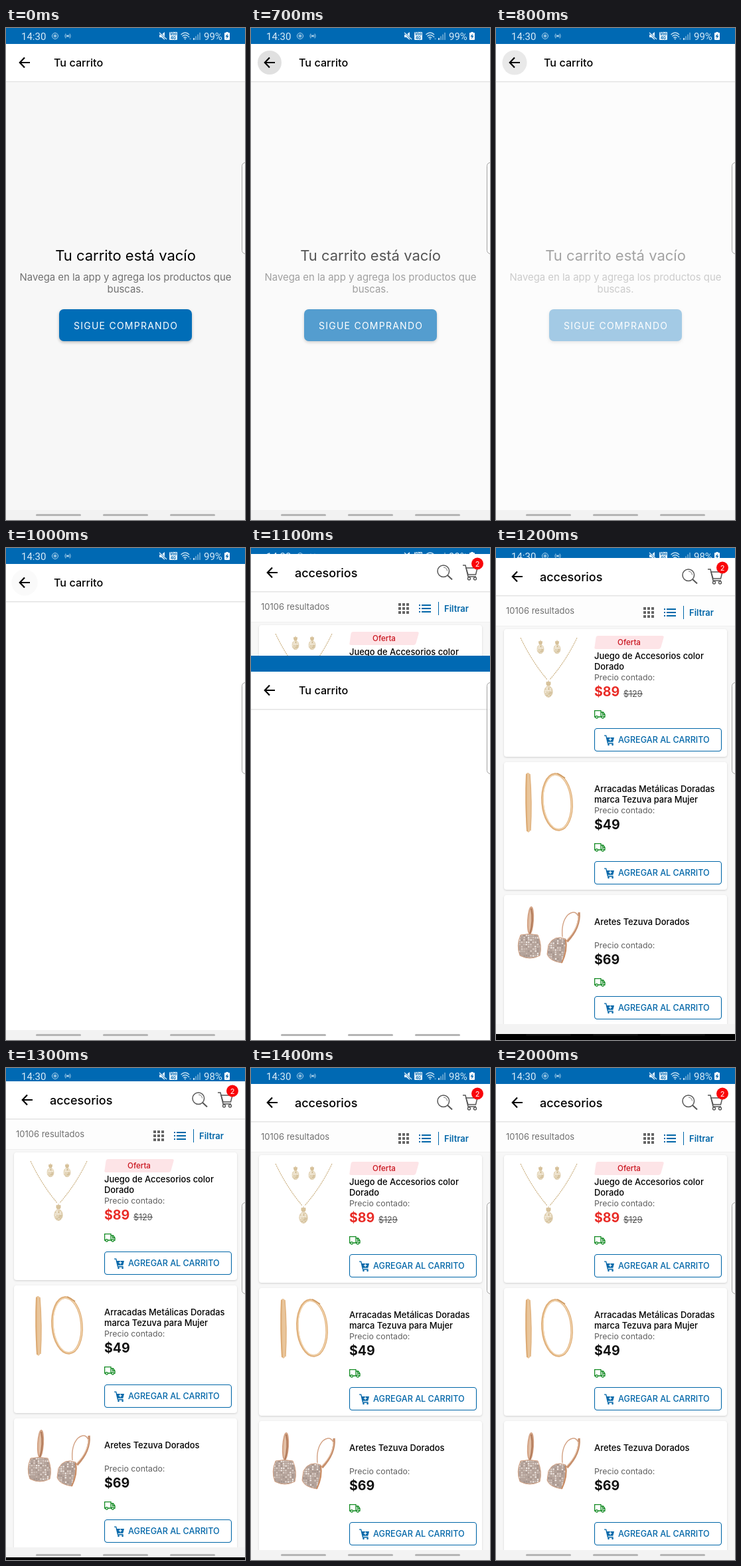
Animation, 360 px wide and 740 px high, one loop 3 s. Source, as an HTML page with a canvas:

```html
<!DOCTYPE html>
<html lang="es">
<head>
<meta charset="utf-8">
<title>Tu carrito</title>
<style>
  html, body { margin: 0; width: 100%; height: 100%; overflow: hidden; background: #fff; }
  canvas { display: block; width: 360px; height: 740px; }
</style>
</head>
<body>
<canvas id="stage" width="360" height="740"></canvas>
<script>
const ctx = document.getElementById('stage').getContext('2d');
const LOOP = 3000, STEP = 100;
const BLUE = '#0069b3', LINK = '#0066a8', GOLD = '#d0b88d', ROSE = '#d3a284';

function rect(x, y, w, h, color) {
  ctx.fillStyle = color;
  ctx.fillRect(x, y, w, h);
}

function roundRect(x, y, w, h, r) {
  ctx.beginPath();
  ctx.roundRect(x, y, w, h, r);
}

function ellipse(x, y, rx, ry = rx, turn = 0) {
  ctx.beginPath();
  ctx.ellipse(x, y, rx, ry, turn, 0, Math.PI * 2);
}

function fill(color, path) {
  ctx.fillStyle = color;
  path ? ctx.fill(path) : ctx.fill();
}

function stroke(color, width = 1, path) {
  ctx.strokeStyle = color;
  ctx.lineWidth = width;
  path ? ctx.stroke(path) : ctx.stroke();
}

function line(d, color, width = 1) { stroke(color, width, new Path2D(d)); }

function at(x, y, draw) {
  ctx.save();
  ctx.translate(x, y);
  draw();
  ctx.restore();
}

function text(str, x, y, size, color, { weight = 400, align = 'left', family = 'Inter', spacing = 0 } = {}) {
  ctx.font = `${weight} ${size}px ${family}, sans-serif`;
  ctx.textAlign = align;
  ctx.letterSpacing = spacing + 'px';
  ctx.fillStyle = color;
  ctx.fillText(str, x, y);
}

function raised(color, blur, offset, shade) {
  ctx.save();
  ctx.shadowColor = `rgba(0,0,0,${shade})`;
  ctx.shadowBlur = blur;
  ctx.shadowOffsetY = offset;
  fill(color);
  ctx.restore();
}

// Small stones scattered on a slightly jittered lattice inside a shape.
function sparkle(shape, x, y, w, h, gap, colors) {
  let seed = 7;
  const random = () => (seed = (seed * 16807) % 2147483647) / 2147483647;
  ctx.save();
  ctx.clip(shape);
  for (let j = 0; j < h; j += gap)
    for (let i = 0; i < w; i += gap) {
      ellipse(x + i + random() * 0.5, y + j + random() * 0.5, gap * 0.36);
      fill(colors[Math.floor(random() * colors.length)]);
    }
  ctx.restore();
}

// ---- System bars ----

function statusBar(time) {
  const pale = '#c4e0f3', dim = '#6aa9d6';
  const roboto = { family: 'Roboto' };
  rect(0, 0, 360, 24, BLUE);
  text('14:30', 23, 18, 15, '#d8ebf7', roboto);

  ellipse(74, 12, 4.5);
  stroke(pale, 0.9);
  line('M71 12H77M74 9V15M72 10L76 14M76 10L72 14', pale, 0.8);
  ellipse(93, 12, 1.3);
  fill(pale);
  line('M90 8.5Q87.5 12 90 15.5M96 8.5Q98.5 12 96 15.5M91.5 10Q90 12 91.5 14M94.5 10Q96 12 94.5 14', pale, 0.8);

  fill('#e4f1fa', new Path2D('M231 10H234L239 6V18L234 14H231Z'));
  line('M231 6L242 18', BLUE, 2.4);
  line('M231 7L242 17', '#e4f1fa', 1.2);

  roundRect(246, 6, 12, 12, 1);
  fill('#e4f1fa');
  text('Voo', 252, 11.3, 5.5, BLUE, { weight: 700, align: 'center' });
  text('4G', 252, 17, 5.5, BLUE, { weight: 700, align: 'center' });

  line('M263.5 10Q270 4 276 10M265.5 12.5Q270 8.5 274.5 12.5M267.5 15Q270 12.5 272 15', pale, 1.4);
  ellipse(269.8, 16.5, 1.1);
  fill(pale);
  fill(time < 2000 ? pale : dim, new Path2D('M274 14L275.3 12L276.6 14Z'));
  fill(time < 2000 ? dim : pale, new Path2D('M276 15.5H279L277.5 17.8Z'));

  for (let i = 0; i < 4; i++) rect(282 + i * 3, 15 - i * 2.7, 2, 3 + i * 2.7, i < 1 ? pale : '#5b9fcf');
  text(time < 1200 ? '99%' : '98%', 298, 18, 15, '#d8ebf7', roboto);

  rect(331.5, 6, 3, 2, '#fff');
  roundRect(329, 7, 8, 11, 1);
  fill('#fff');
  fill(BLUE, new Path2D('M334 8.5L330.5 13H332.7L332 16.7L335.6 11.8H333.3Z'));
}

function pills(color) {
  for (const x of [45, 146, 247]) {
    roundRect(x, 731, 68, 3, 1.5);
    fill(color);
  }
}

function edgeHandle() {
  roundRect(355.5, 202.5, 12, 137, 5);
  fill('rgba(255,255,255,.65)');
  stroke('#a2a2a2', 1);
}

// ---- Shared pieces ----

function appBar(title, arrowX, titleX, size, baseline) {
  rect(0, 24, 360, 56, '#fff');
  rect(0, 80, 360, 1, '#e4e4e4');
  rect(0, 81, 360, 1, '#f0f0f0');
  line(`M${arrowX + 16} 52H${arrowX + 1}M${arrowX + 8} 44.5L${arrowX + 0.8} 52L${arrowX + 8} 59.5`, '#000', 2.2);
  text(title, titleX, baseline, size, '#000', { weight: 500 });
}

function cartIcon(x, y, scale, color, solid) {
  at(x, y, () => {
    ctx.scale(scale, scale);
    const basket = new Path2D('M5 5H22L19.5 15H8Z');
    if (solid) fill(color, basket);
    else stroke(color, 1.5, basket);
    line('M0 1H4L8 18H20', color, solid ? 2 : 1.5);
    for (const wheel of [9.5, 18.5]) {
      ellipse(wheel, 21, 2);
      solid ? fill(color) : stroke(color, 1.4);
    }
    if (solid) line('M13.5 6V13M10 9.5H17', '#fff', 1.8);
  });
}

// ---- Empty cart ----

function emptyCart(contentAlpha, ripple) {
  rect(0, 24, 360, 716, '#fff');
  if (contentAlpha > 0) {
    const center = { align: 'center' };
    rect(0, 81, 360, 644, '#f7f7f7');
    text('Tu carrito está vacío', 180, 350, 22, '#000', center);
    text('Navega en la app y agrega los productos que', 180, 380, 14.9, '#717171', center);
    text('buscas.', 180, 398, 14.9, '#717171', center);
    roundRect(80, 423, 200, 48, 7);
    raised('#006db7', 4, 2, 0.25);
    text('SIGUE COMPRANDO', 180.6, 452.5, 14, '#fff', { align: 'center', spacing: 1.25 });
    rect(0, 81, 360, 644, `rgba(255,255,255,${1 - contentAlpha})`);
  }
  appBar('Tu carrito', 20, 72, 16.2, 58);
  if (ripple) {
    ellipse(28, 52, ripple.radius);
    fill(`rgba(0,0,0,${ripple.alpha})`);
  }
}

// ---- Jewellery ----

function pineapple(x, y, s) {
  const body = new Path2D();
  body.ellipse(x, y, 6.3 * s, 8.5 * s, 0, 0, Math.PI * 2);
  fill('#e6d9bf', body);
  sparkle(body, x - 7, y - 9, 14, 18, 2.4, ['#c5ad80', '#f8f2e6', '#dccba9']);
  stroke('#d8c5a0', 0.6, body);
  ellipse(x, y - 12 * s, 3.6 * s, 3.2 * s);
  fill('#dcc9a4');
  line(`M${x - 3 * s} ${y - 15 * s}L${x - 1.5 * s} ${y - 9 * s}M${x + 3 * s} ${y - 15 * s}L${x + 1.5 * s} ${y - 9 * s}M${x} ${y - 17 * s}V${y - 9 * s}`, GOLD, 0.8);
}

function necklace() {
  ctx.save();
  ctx.setLineDash([2.2, 0.8]);
  line('M37 144Q53 178 77 207M122 144Q106 178 81 207', GOLD, 1.2);
  ctx.restore();
  pineapple(67, 161, 0.8);
  pineapple(92, 161, 0.8);
  pineapple(79, 225, 1);
}

function hoops() {
  fill('#e9c59a', new Path2D('M45 349Q48 345 51 349Q55 392 52 433Q49 440 46 434Q43 392 45 349Z'));
  line('M46 349Q44.500 392 47 435', '#dcaa74', 2);
  line('M51 349Q54.500 392 52 434', '#e0b27f', 1.4);
  ellipse(92, 391, 22, 42, -0.08);
  stroke('#e0b17d', 3.6);
  ellipse(92.5, 391, 21.4, 41.2, -0.08);
  stroke('#f5dcb9', 1.2);
  line('M92 348L104 355', '#cf9c66', 2);
}

function studs() {
  const stones = ['#a2938c', '#efe9e5', '#c9bcb4', '#b3a49c', '#ded3cc'];
  const base = '#b5a299';
  ellipse(52, 569, 4, 20, 0.06);
  fill('#e2bfa5');
  stroke(ROSE, 2);
  line('M53 551Q57 570 51 590', '#b27c5c', 2.4);
  const left = new Path2D('M37 591Q50 588 63 591Q70 607 66 622Q51 630 36 622Q30 607 37 591Z');
  fill(base, left);
  sparkle(left, 32, 588, 38, 42, 3.4, stones);
  stroke(ROSE, 1, left);

  line('M100 594Q98 572 108 561Q119 552 124 563', ROSE, 1.4);
  line('M125 557Q127 580 107 601', '#c7906d', 3.4);
  line('M124 562Q124 581 107 598', '#ecd0ba', 1.1);
  const right = new Path2D('M79 606Q88 590 105 597Q106 615 99 633Q80 630 77 620Z');
  fill(base, right);
  sparkle(right, 76, 593, 32, 42, 3.4, stones);
  stroke(ROSE, 1, right);
  line('M105 598Q108 615 99 633', '#c98b62', 2);
}

// ---- Results list ----

function truck(x, y) {
  at(x, y, () => {
    const green = '#128a22';
    line('M2 10H.6V.6H10V10H5.500M10 3H13.500L16 6.500V10H14.500M10 10H11M12.500 3V6.500H16', green, 1.3);
    for (const wheel of [3.7, 12.8]) {
      ellipse(wheel, 10.4, 1.7);
      stroke(green, 1.3);
    }
  });
}

function card({ top, height, title, titleY, priceY, price, before, picture }) {
  roundRect(12, top, 336, height, 4);
  raised('#fff', 3, 1, 0.16);
  picture();
  title.forEach((row, i) => text(row, 148, titleY + i * 15.7, 12.9, '#000', { weight: 500 }));
  text('Precio contado:', 148, priceY, 12.3, '#606060');
  text(price, 148, priceY + 24, 19.6, before ? '#e92c27' : '#111', { weight: 700 });
  if (before) {
    text(before, 192, priceY + 24.5, 12.5, '#555');
    rect(192, priceY + 20, 29, 1, '#555');
  }
  truck(148, priceY + 45);
  roundRect(148.5, priceY + 72.5, 191, 34, 4);
  stroke(LINK, 1.1);
  cartIcon(163, priceY + 82.5, 0.68, LINK, true);
  text('AGREGAR AL CARRITO', 184, priceY + 94, 12.6, LINK, { weight: 500 });
}

const cards = [
  { top: 131, height: 192, title: ['Juego de Accesorios color', 'Dorado'], titleY: 176, priceY: 208, price: '$89', before: '$129', picture: necklace },
  { top: 331, height: 192, title: ['Arracadas Metálicas Doradas', 'marca Tezuva para Mujer'], titleY: 376, priceY: 408, price: '$49', picture: hoops },
  { top: 531, height: 200, title: ['Aretes Tezuva Dorados'], titleY: 576, priceY: 611, price: '$69', picture: studs }
];

function results() {
  rect(0, 80, 360, 46, '#fdfdfd');
  rect(0, 126, 360, 614, '#f7f7f7');
  appBar('accesorios', 24, 66, 18, 59);

  ellipse(289.8, 49.7, 8.8);
  stroke('#555', 1.5);
  line('M290 44Q295 44.500 295.500 49.500', '#777', 1);
  line('M296 56L303 62.500', '#555', 2);
  cartIcon(319, 40, 1, '#555', false);
  ellipse(341, 38.5, 9);
  fill('#f90509');
  text('2', 341, 42.5, 11, '#fff', { align: 'center' });

  text('10106 resultados', 15, 107.5, 13, '#707070');
  for (let i = 0; i < 9; i++) rect(222 + (i % 3) * 6, 98 + Math.floor(i / 3) * 6, 4, 4, '#666');
  for (let y = 100; y < 113; y += 5) {
    rect(253, y, 2, 2, LINK);
    rect(257, y, 14, 2, LINK);
  }
  rect(282, 96, 1, 20, LINK);
  text('Filtrar', 291, 110.5, 13, LINK, { weight: 600 });
  rect(0, 126, 360, 1, '#efefef');

  cards.forEach(card);
  fill('#fde4e7', new Path2D('M154 141H250Q253.500 141 252.500 144L248.500 158Q247.500 161 244.500 161H151Q147.500 161 148.500 158L150.500 144Q151 141 154 141Z'));
  text('Oferta', 200.5, 155, 11.5, '#c9121c', { align: 'center', weight: 500 });
  rect(0, 725, 360, 15, '#f3f3f3');
}

// ---- Timeline ----

function draw(now) {
  const time = Math.floor((now % LOOP) / STEP) * STEP;
  ctx.clearRect(0, 0, 360, 740);
  statusBar(time);

  if (time < 1100) {
    const step = (time - 700) / STEP;
    const leaving = step >= 0;
    const alpha = leaving ? Math.max(0, 0.67 - 0.31 * step) : 1;
    emptyCart(alpha, leaving && { radius: 18 + step * 0.6, alpha: 0.12 - 0.034 * step });
    rect(0, 725, 360, 15, '#f2f2f2');
    pills('#b5b5b5');
  } else {
    // The list settles down from 2% of the height above its place.
    const remaining = Math.max(0, (1400 - time) / 300);
    const shift = -Math.round(14.8 * remaining ** 1.2);
    rect(0, 700, 360, 40, '#000');
    at(0, shift, results);
    if (time < 1200) at(0, 162, () => {
      rect(0, 0, 360, 24, BLUE);
      emptyCart(0);
    });
    pills(time === 1200 ? '#0e0e0e' : '#b5b5b5');
  }
  edgeHandle();
}

const start = performance.now();
function tick() {
  draw(performance.now() - start);
  requestAnimationFrame(tick);
}
tick();
</script>
</body>
</html>
```
